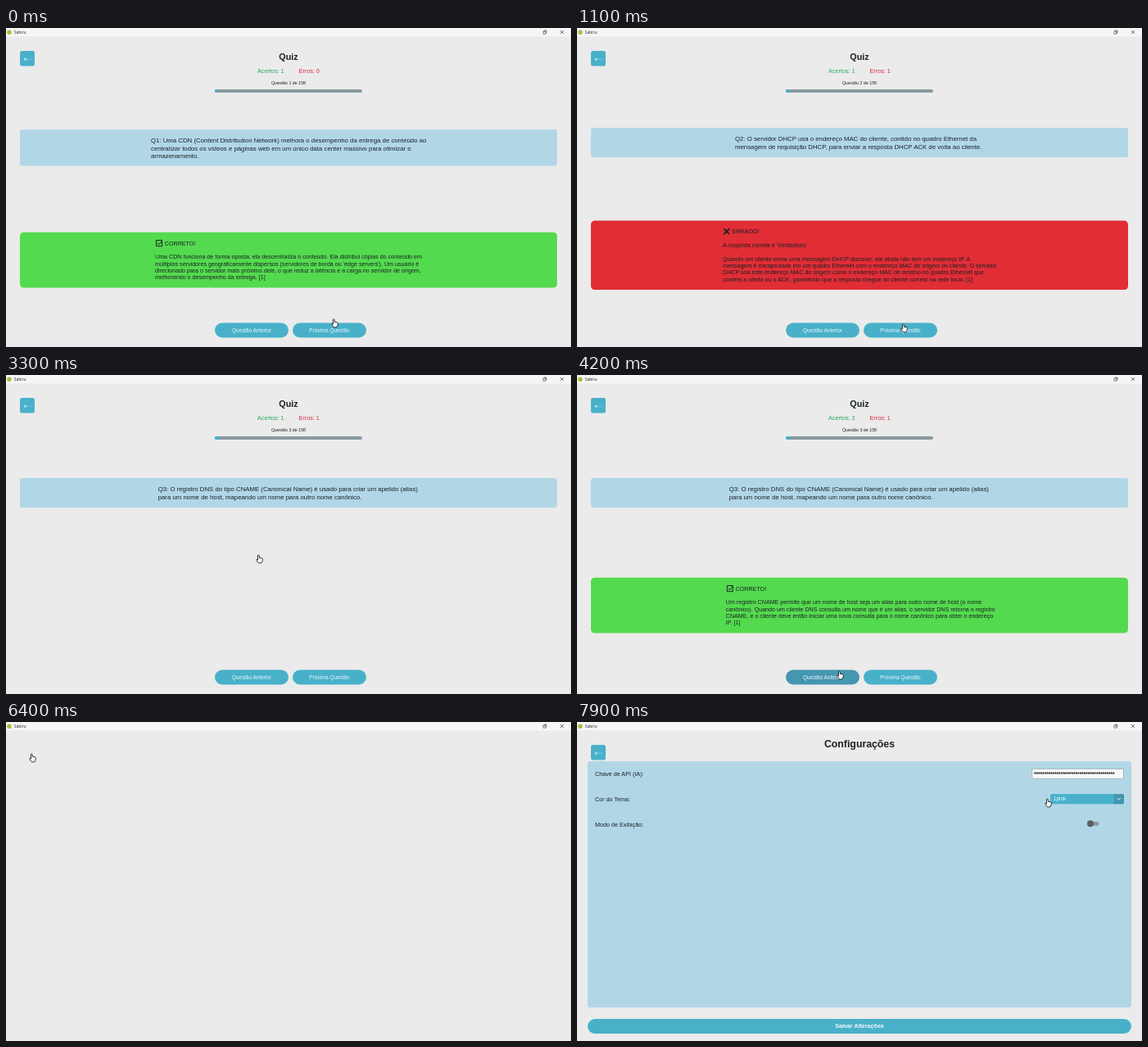
Animation of 690x390 px, one loop 8 s. Source, as an HTML page:

```html
<!DOCTYPE html>
<html lang="pt-BR">
<head>
<meta charset="utf-8">
<title>Sabiru</title>
<style>
html, body { margin: 0; width: 100%; height: 100%; overflow: hidden; background: #ebebeb; }
svg { display: block; width: 690px; height: 390px; font-family: "Liberation Sans", Arial, sans-serif; }
</style>
</head>
<body>
<svg id="stage" viewBox="0 0 690 390"></svg>
<script>
const LOOP = 8000;
const MAIN = '#48b1c9', DARK = '#4596b0', PALE = '#b1d7e7', INK = '#1b2126', LIME = '#a0c43c';

const rect = (x, y, w, h, r, fill, more = '') =>
  `<rect x="${x}" y="${y}" width="${w}" height="${h}" rx="${r}" fill="${fill}" ${more}/>`;
const line = (d, color, width, fill = 'none') =>
  `<path d="${d}" fill="${fill}" stroke="${color}" stroke-width="${width}"/>`;
const text = (x, y, size, str, fill = INK, more = '') =>
  `<text x="${x}" y="${y}" font-size="${size}" fill="${fill}" ${more}>${str}</text>`;
const mid = 'text-anchor="middle"', bold = 'font-weight="700"';
const lines = (x, y, size, step, rows) => rows.map((s, i) => text(x, y + i * step, size, s)).join('');

const titleBar = rect(0, 0, 690, 10.5, 0, '#f6f6f6') +
  `<circle cx="4" cy="5.2" r="2.8" fill="${LIME}"/>` +
  text(9.7, 7, 5, 'Sabiru', INK, 'style="font-family:\'Open Sans\',sans-serif"') +
  line('M656 4.2h3v3h-3zM657 4v-1h3v3h-.8', '#333', .6) +
  line('M677 3l4 4m0-4l-4 4', '#333', .7);

const backButton = rect(17, 28, 18, 18.5, 2.5, MAIN) +
  line('M24 36.3l-2 1.9l2 1.9M22 38.2h4', '#e4f4f8', .8) +
  line('M26.5 38.2h5', '#8dcfde', .6);

const questions = [
  { top: 124, height: 44.5, x: 177, rows: [
      'Q1: Uma CDN (Content Distribution Network) melhora o desempenho da entrega de conteúdo ao',
      'centralizar todos os vídeos e páginas web em um único data center massivo para otimizar o',
      'armazenamento.'],
    right: true, boxTop: 249.8, boxHeight: 67.8, boxX: 182, answer: [
      'Uma CDN funciona de forma oposta: ela descentraliza o conteúdo. Ela distribui cópias do conteúdo em',
      "múltiplos servidores geograficamente dispersos (servidores de borda ou 'edge servers'). Um usuário é",
      'direcionado para o servidor mais próximo dele, o que reduz a latência e a carga no servidor de origem,',
      'melhorando o desempenho da entrega. [1]'] },
  { top: 122, height: 36, x: 193, rows: [
      'Q2: O servidor DHCP usa o endereço MAC do cliente, contido no quadro Ethernet da',
      'mensagem de requisição DHCP, para enviar a resposta DHCP ACK de volta ao cliente.'],
    right: false, boxTop: 235.6, boxHeight: 84.4, boxX: 178, answer: [
      "A resposta correta é 'Verdadeiro'", '',
      'Quando um cliente envia uma mensagem DHCP discover, ele ainda não tem um endereço IP. A',
      'mensagem é encapsulada em um quadro Ethernet com o endereço MAC de origem do cliente. O servidor',
      'DHCP usa este endereço MAC de origem como o endereço MAC de destino no quadro Ethernet que',
      'contém a oferta ou o ACK, garantindo que a resposta chegue ao cliente correto na rede local. [1]'] },
  { top: 126, height: 36.3, x: 185.7, rows: [
      'Q3: O registro DNS do tipo CNAME (Canonical Name) é usado para criar um apelido (alias)',
      'para um nome de host, mapeando um nome para outro nome canônico.'],
    right: true, boxTop: 247.8, boxHeight: 67.8, boxX: 181.8, answer: [
      'Um registro CNAME permite que um nome de host seja um alias para outro nome de host (o nome',
      'canônico). Quando um cliente DNS consulta um nome que é um alias, o servidor DNS retorna o registro',
      'CNAME, e o cliente deve então iniciar uma nova consulta para o nome canônico para obter o endereço',
      'IP. [1]'] }
];

function result(q) {
  const { boxTop: y, boxX: x } = q;
  const icon = q.right
    ? line(`M${x + 1.5} ${y + 9.7}h7v7.2h-7zM${x + 3} ${y + 13}l1.8 2l3.8-4.6`, INK, 1)
    : line(`M${x + 1.5} ${y + 9.8}l6.5 6.6m.3-6.9l-7 7`, INK, 1.7);
  return rect(17, y, 656, q.boxHeight, 4.5, q.right ? '#54da4e' : '#e12d36') + icon +
    text(x + 11.8, y + 15.8, 7.15, q.right ? 'CORRETO!' : 'ERRADO!') +
    lines(x, y + 32.6, 7.13, 8.3, q.answer);
}

function quiz(n, hits, misses, answered) {
  const q = questions[n - 1];
  return backButton + text(345, 38.5, 10.8, 'Quiz', INK, mid + bold) +
    text(307, 54.5, 7.25, 'Acertos: ' + hits, '#22ac5e') +
    text(357.5, 54.5, 7.25, 'Erros: ' + misses, '#d82a42') +
    text(345, 68.7, 5.3, `Questão ${n} de 158`, INK, mid) +
    rect(255, 75, 180, 4, 2, '#899a9f') + rect(255, 75, 2.5 + n * 1.1, 4, 1.8, MAIN) +
    rect(17, q.top, 656, q.height, 3, PALE) + lines(q.x, q.top + 16.4, 7.8, 9.1, q.rows) +
    (answered ? result(q) : '');
}

const gear = `<circle cx="26.5" cy="37.2" r="4.6" fill="none" stroke="${INK}" stroke-width="1.5" stroke-dasharray="1.8 1.813"/>` +
  `<circle cx="26.5" cy="37.2" r="3.8" fill="none" stroke="${INK}" stroke-width=".9"/>` +
  `<circle cx="26.5" cy="37.2" r="1.5" fill="none" stroke="${INK}" stroke-width=".8"/>`;

const home = gear + `<circle cx="322" cy="37.7" r="8.5" fill="${LIME}"/>` +
  text(335, 41.6, 12.6, 'Sabiru', INK, bold) +
  rect(300, 60.3, 90, 22, 11, MAIN) + text(345, 74, 7.2, 'Importar Quiz', '#eef8fa', mid) +
  rect(205, 97, 280, 140.3, 2.5, PALE) + rect(479.5, 102, 4, 130.5, 1, '#838d93');

const settings = text(345, 31, 12.3, 'Configurações', INK, mid + bold) +
  rect(13, 48, 664, 301, 3, PALE) + backButton +
  ['Chave de API (IA):', 'Cor do Tema:', 'Modo de Exibição:']
    .map((s, i) => text(22, 66 + i * 30.8, 7.2, s)).join('') +
  rect(555.8, 57.3, 111.7, 12, 2, '#f9f9fa', 'stroke="#949ea3" stroke-width=".7"') +
  text(558, 66, 6.5, '*'.repeat(39), '#111', bold) +
  rect(578, 88, 90, 12.3, 2.2, MAIN) +
  `<path d="M655.7 88h10.1q2.2 0 2.2 2.2v7.9q0 2.2-2.2 2.2h-10.1z" fill="${DARK}"/>` +
  line('M659.8 93.2l2 1.9l2-1.9', '#fff', .9) + text(582, 96.4, 6.4, '1pink', '#f0f9fb') +
  rect(624.5, 121.8, 13, 5, 2.5, '#8b999e') + '<circle cx="627" cy="124.3" r="4" fill="#576167"/>' +
  rect(13, 363, 664, 18, 9, MAIN) + text(345, 374.4, 7.15, 'Salvar Alterações', '#f2fafb', mid + bold);

const scenes = [
  [0, quiz(1, 1, 0, true)],
  [200, quiz(2, 1, 0, false)],
  [800, quiz(2, 1, 1, true)],
  [2600, quiz(3, 1, 1, false)],
  [3500, quiz(3, 2, 1, true)],
  [4900, home],
  [6300, ''],
  [6600, settings]
];

const navButton = (id, x, label) => rect(x, 360.5, 90, 18, 9, MAIN, `id="${id}"`) +
  text(x + 45, 372, 6.38, label, '#eaf6f9', mid);

const hand = 'M-2.6-4.2q.2-1 1-.8q.7.1.8 1l.2 2.4l3 .5q1.2.3 1 1.6l-.5 2.6q-.3 1.7-2 1.8h-1.8' +
  'q-1 0-1.6-1l-1.6-2.6q-.4-1 .5-1l1.2.7z';

// Pointer stops: time, x, y
const stops = [
  [0, 402, 361], [100, 402, 361], [400, 390, 225], [700, 390, 225], [1100, 400, 367],
  [1500, 400, 367], [1800, 300, 369], [2000, 300, 369], [2400, 377, 369], [2600, 377, 369],
  [3200, 310, 225], [3500, 310, 225], [4000, 322, 367], [4200, 322, 367], [4800, 36, 43],
  [5850, 36, 43], [5900, 33, 44], [6700, 33, 44], [7800, 576, 99], [LOOP, 576, 99]
];

const stage = document.getElementById('stage');
stage.innerHTML = rect(0, 0, 690, 390, 0, '#ebebeb') + titleBar +
  scenes.map(s => `<g class="scene">${s[1]}</g>`).join('') +
  `<g id="nav">${navButton('prev', 255, 'Questão Anterior')}${navButton('next', 350, 'Próxima Questão')}</g>` +
  `<g id="pointer">${line(hand, '#161a1e', .9, '#fff')}</g>`;

const groups = [...stage.querySelectorAll('.scene')];
const [nav, prev, next, pointer] = ['nav', 'prev', 'next', 'pointer'].map(id => document.getElementById(id));
const show = (el, on) => el.setAttribute('display', on ? 'inline' : 'none');
const within = (t, a, b) => t >= a && t < b;

function pointerAt(t) {
  const i = stops.findIndex(s => s[0] > t);
  const [t0, x0, y0] = stops[i - 1], [t1, x1, y1] = stops[i];
  const u = (t - t0) / (t1 - t0), e = u * u * (3 - 2 * u);
  return [x0 + (x1 - x0) * e, y0 + (y1 - y0) * e];
}

function draw(now) {
  const t = now % LOOP;
  const current = scenes.filter(s => s[0] <= t).length - 1;
  groups.forEach((g, i) => show(g, i === current));
  show(nav, t < 4900);
  prev.setAttribute('fill', within(t, 1700, 2300) || within(t, 4000, 4350) ? DARK : MAIN);
  next.setAttribute('fill', within(t, 2380, 2600) ? DARK : MAIN);
  pointer.setAttribute('transform', `translate(${pointerAt(t)})`);
  requestAnimationFrame(draw);
}
requestAnimationFrame(draw);
</script>
</body>
</html>
```
